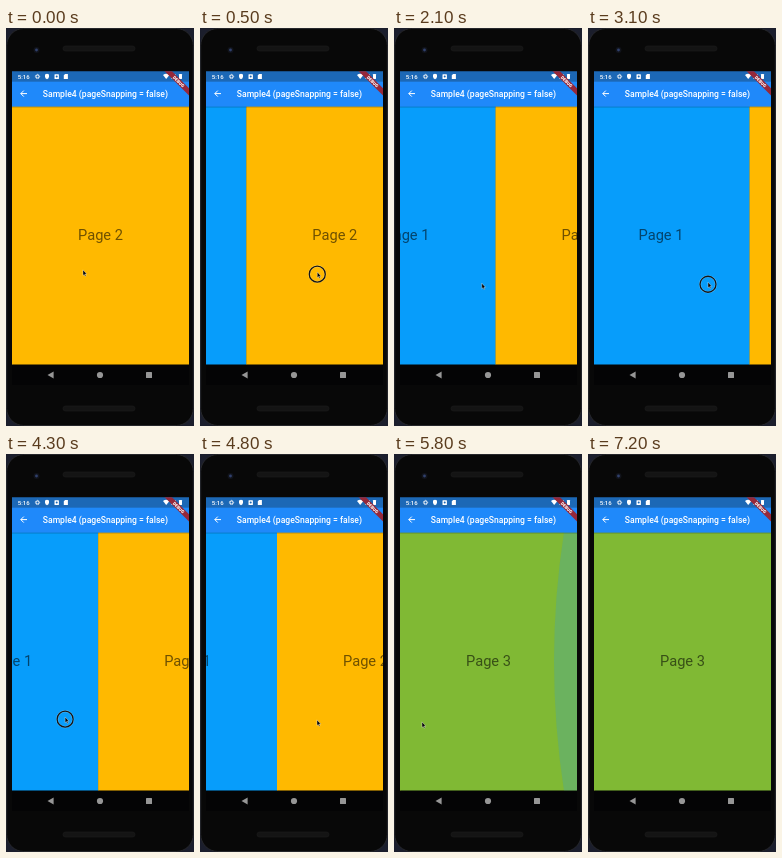
Recreate the animation shown at these times as an HTML page. Size 188 by 398 pixels, loop 7.3 s.

```html
<!DOCTYPE html>
<html lang="en">
<head>
<meta charset="utf-8">
<title>Page view</title>
<style>
  html, body { margin: 0; width: 100%; height: 100%; overflow: hidden; background: #1b1e2c; }
  svg { display: block; width: 188px; height: 398px; font-family: Roboto, sans-serif; }
  .page text { font-size: 14.64px; text-anchor: middle; fill: #000; fill-opacity: .57; }
</style>
</head>
<body>
<svg viewBox="0 0 188 398">
  <defs>
    <clipPath id="screen"><rect x="6" y="43.3" width="177" height="293.2"/></clipPath>
    <rect id="speaker" x="57" y="-2.5" width="72" height="5" rx="2.5" fill="#141414" stroke="#1e1e1e" stroke-width=".6"/>
  </defs>

  <rect x=".7" y=".5" width="186.6" height="397" rx="17" fill="#080808" stroke="#26272b"/>
  <use href="#speaker" y="20.5"/>
  <use href="#speaker" y="380.5"/>
  <circle cx="30.5" cy="22" r="3" fill="#11131a"/>
  <circle cx="30.5" cy="22" r="1.4" fill="#30406c"/>
  <rect x="6" y="336" width="177" height="21" fill="#040405"/>
  <g fill="#969696">
    <path d="M41.5 347L47.6 343.5V350.5Z"/>
    <circle cx="94" cy="347" r="3.1"/>
    <rect x="140" y="344" width="6" height="6" rx=".5"/>
  </g>

  <g clip-path="url(#screen)">
    <g id="pages"></g>
    <path id="glow" fill="#2196f3"/>
    <rect x="6" y="78" width="177" height="1.6" opacity=".2"/>
    <rect x="6" y="43" width="177" height="11" fill="#1c68b6"/>
    <rect x="6" y="53.7" width="177" height="24.9" fill="#1f89fa"/>
    <g fill="#fff">
      <text x="11.8" y="50.8" font-size="6" font-weight="500">5:16</text>
      <circle cx="31.5" cy="48.5" r="1.5" fill="none" stroke="#fff"/>
      <circle cx="31.5" cy="48.5" r="2.2" fill="none" stroke="#fff" stroke-width=".7" stroke-dasharray=".9 .83"/>
      <path d="M41 45.8L43 46.6V48.5Q43 50.4 41 51.3Q39 50.4 39 48.5V46.6Z"/>
      <rect x="48.5" y="46.2" width="4.4" height="4.8" rx=".6"/>
      <circle cx="50.7" cy="48.6" r="1" fill="#1c68b6"/>
      <path d="M57.8 47.3L59.1 46.1H61.9V51H57.8Z"/>
      <path d="M157 47Q160.2 44.6 163.4 47L160.2 51Z"/>
      <path d="M165 51L170 46V51Z"/>
      <rect x="173" y="46" width="3" height="5" rx=".4"/>
      <text x="36.8" y="68.7" font-size="8.61" font-weight="500">Sample4 (pageSnapping = false)</text>
    </g>
    <path d="M21 65.6H14.8M17.8 62.6L14.8 65.6L17.8 68.6" fill="none" stroke="#fff"/>
    <g transform="translate(183 43.3) rotate(45)">
      <rect x="-20" y="12" width="40" height="5.2" fill="#96283a"/>
      <text y="16.2" font-size="4.4" font-weight="900" text-anchor="middle" fill="#fff">DEBUG</text>
    </g>
  </g>

  <g id="cursor">
    <g id="ring" fill="none">
      <circle r="8" stroke="#fff" stroke-opacity=".3" stroke-width="2.2"/>
      <circle r="8" stroke="#151515" stroke-width="1.3"/>
    </g>
    <path transform="translate(0 -.5) scale(.8)" d="M0 -2V5L1.6 3.6L2.7 6L3.8 5.5L2.7 3.2H4.7Z"
      fill="#000" stroke="#fff" stroke-opacity=".75" stroke-width=".6"/>
  </g>
</svg>
<script>
const LOOP = 7300, STEP = 100, LEFT = 6, WIDTH = 177, RIGHT = LEFT + WIDTH;
const FLING_MS = 300;
const $ = id => document.getElementById(id);

// Each drag moves the pages with the pointer; fling is the glide after release.
const drags = [
  { start: 200, end: 900, from: [77, 244], to: [171, 249], fling: 1.5 },
  { start: 2500, end: 3300, from: [60, 260], to: [140, 255], fling: 1.5 },
  { start: 3700, end: 4400, from: [150, 260], to: [44, 266], fling: 0 },
  { start: 4800, end: 5400, from: [117, 268], to: [28, 270], fling: -159 }
];

const clamp = v => Math.max(0, Math.min(1, v));
const progress = (t, start, end) => clamp((t - start) / (end - start));
const mix = (a, b, p) => a + (b - a) * p;
const easeOut = p => 1 - (1 - p) ** 2;

$('pages').innerHTML = ['#079dfb', '#ffb900', '#80b934'].map((color, i) => {
  const x = (i - 1) * WIDTH;
  return `<g class="page"><rect x="${x}" y="78" width="${WIDTH + .3}" height="259" fill="${color}"/>
    <text x="${x + WIDTH / 2}" y="212.3">Page ${i + 1}</text></g>`;
}).join('');

function draw(t) {
  let edge = LEFT, pressed = false, [x, y] = drags[0].from;
  drags.forEach(({ start, end, from, to, fling }, i) => {
    const p = progress(t, start, end);
    edge += (to[0] - from[0]) * p + fling * easeOut(progress(t, end, end + FLING_MS));
    if (t <= start) return;
    pressed = t <= end;
    const next = drags[i + 1];
    const back = next ? progress(t, end, next.start) : 0;
    [x, y] = to.map((v, n) => mix(mix(from[n], v, p), next ? next.from[n] : v, back));
  });
  $('pages').setAttribute('transform', `translate(${edge} 0)`);
  $('cursor').setAttribute('transform', `translate(${x} ${y})`);
  $('cursor').style.display = t < 6700 ? '' : 'none';
  $('ring').style.display = pressed ? '' : 'none';

  // overscroll glow swells, then recedes
  const glow = Math.min(progress(t, 5500, 5800), 1 - progress(t, 5800, 6400));
  const rim = RIGHT - 13 * glow, belly = RIGHT - 33 * glow;
  $('glow').setAttribute('d', `M${RIGHT} 78H${rim}Q${belly} 207 ${rim} 337H${RIGHT}Z`);
  $('glow').setAttribute('opacity', .22 * glow);
}

const began = performance.now();
function tick() {
  const t = (performance.now() - began) % LOOP;
  draw(Math.floor(t / STEP) * STEP);
  requestAnimationFrame(tick);
}
tick();
</script>
</body>
</html>
```
